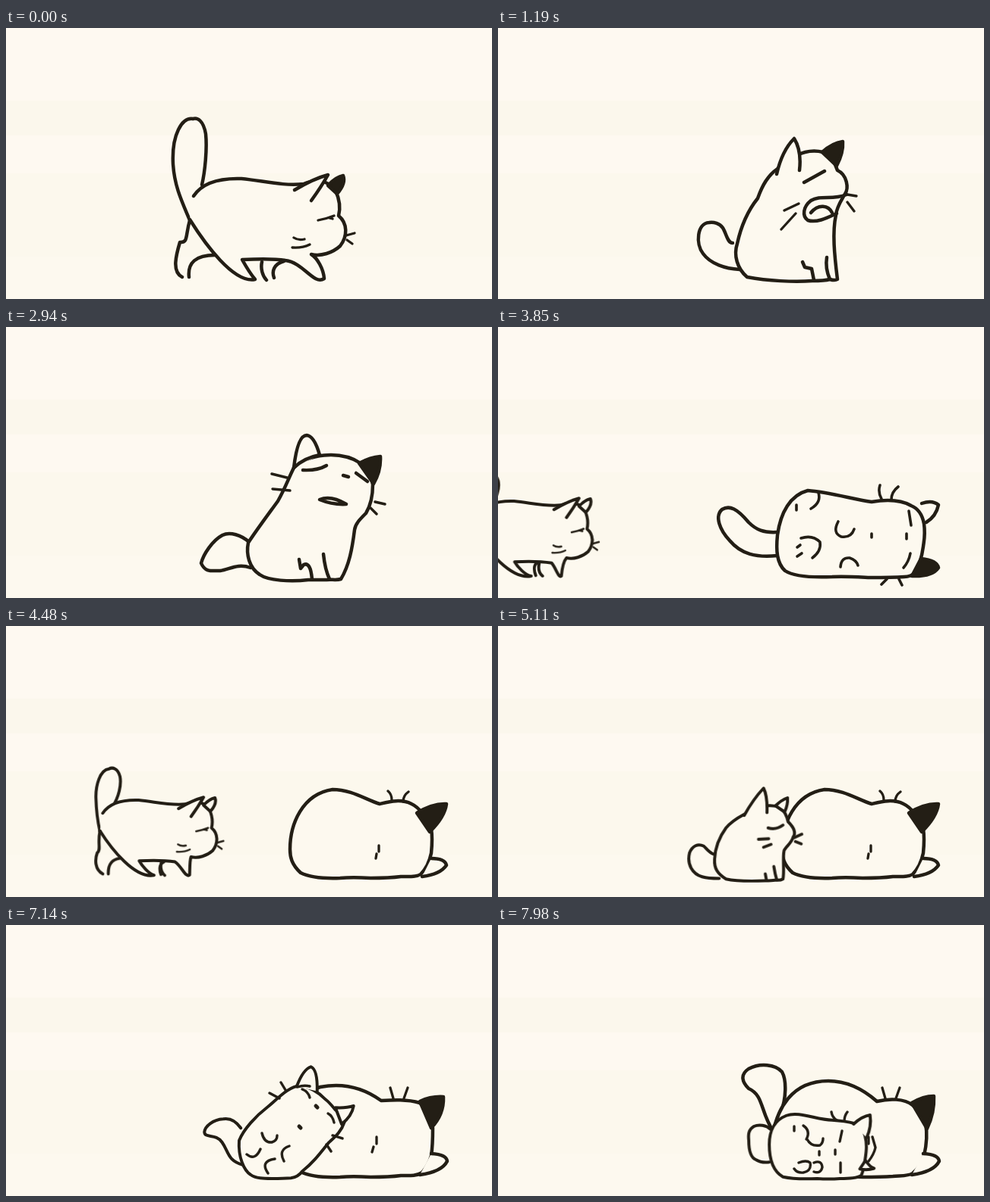
These frames come from a looping animation (640x358 px, 8000 ms). An HTML page without scripts:

```html
<!DOCTYPE html>
<html lang="en">
<head>
<meta charset="utf-8">
<title>Two sleepy cats</title>
<style>
html, body { margin: 0; width: 100%; height: 100%; overflow: hidden; background: #fef9f1; }
svg { display: block; width: 100%; height: 100%; }
.cat { fill: none; stroke: #231e15; stroke-width: 4.5; stroke-linecap: round; stroke-linejoin: round; }
.two { stroke-width: 5.3; }

/* every part holds its own outline for each pose */
.body {
  fill: #fdf9ef;
  --walk: path("M247,222 C258,205 280,198 310,199 C340,202 365,209 392,206 C405,200 425,200 434,215 C440,228 440,240 438,248 C450,258 450,275 440,288 C430,297 415,302 402,299 C410,304 418,318 419,331 C405,340 392,310 368,307 C350,304 330,305 311,306 C316,315 322,325 328,332 C300,338 262,285 242,253");
  --step: path("M247,222 C258,205 280,198 310,199 C340,202 365,209 392,206 C405,200 425,200 434,215 C440,228 440,240 438,248 C450,258 450,275 440,288 C430,297 415,302 402,299 C396,306 394,320 393,331 C388,335 384,318 376,308 C350,304 330,305 311,306 C316,315 330,330 340,331 C305,338 262,285 242,253");
  --sit: path("M307,296 C308,275 316,256 327,241 C336,230 346,224 359,217 C380,202 405,198 423,205 C430,212 434,220 436,230 C446,240 450,250 445,257 C442,268 432,274 429,281 C426,295 430,318 427,331 C422,334 418,333 413,333 C408,334 402,334 396,334 C370,335 345,335 327,331 C312,322 306,312 307,296");
  --yawn: path("M315,285 C320,262 330,240 342,225 C348,208 355,195 368,186 C385,170 405,158 428,164 C437,168 444,178 447,188 C460,194 462,212 457,219 C452,228 446,236 445,247 C440,270 443,300 447,332 C444,334 440,333 437,332 C430,334 420,334 414,334 C390,336 355,334 328,329 C315,318 310,300 315,285");
  --look: path("M319,285 C330,268 345,248 358,230 C368,212 372,200 379,186 C395,168 440,162 467,180 C474,184 480,195 483,208 C483,222 480,236 474,246 C466,254 460,260 459,268 C456,292 452,315 441,333 C435,335 428,333 422,334 C414,334 406,334 398,334 C375,337 345,335 334,327 C320,318 316,300 319,285");
  --tip: path("M336,265 C344,245 365,222 387,205 C405,190 422,170 444,168 C462,172 476,180 487,192 C495,198 500,205 505,211 C512,216 520,222 521,232 C515,250 505,258 493,269 C478,288 465,305 447,319 C442,326 435,330 427,331 C415,332 405,332 393,332 C380,332 365,332 356,325 C345,318 334,295 336,265");
  --belly: path("M368,275 C372,245 385,222 408,216 C435,218 470,228 492,231 C510,228 530,228 544,236 C554,240 559,249 561,260 C563,275 561,282 560,290 C558,305 555,315 549,324 C547,328 540,330 535,330 C520,331 505,331 490,331 C470,330 455,329 440,330 C415,331 390,330 378,322 C367,312 366,295 368,275");
  --curl: path("M374,295 C374,262 390,222 430,216 C455,216 475,230 492,235 C505,232 520,228 534,235 C545,240 555,255 560,268 C562,280 561,290 560,300 C557,315 552,322 546,328 C540,332 530,331 520,331 C505,333 490,333 480,333 C465,332 450,332 440,333 C415,334 400,332 388,326 C376,315 374,305 374,295");
  --flick: path("M374,295 C374,262 390,220 414,214 C445,208 472,216 494,232 C510,231 528,230 545,235 C552,242 558,255 562,268 C562,280 562,291 560,305 C556,318 552,322 548,327 C540,332 530,331 520,331 C505,333 490,333 480,333 C465,332 450,332 440,333 C415,334 400,332 388,326 C376,315 374,305 374,295");
  --end: path("M362,275 C368,245 385,206 435,206 C462,206 482,218 499,233 C515,229 535,229 546,238 C555,245 560,252 563,262 C566,278 564,292 561,305 C557,318 551,324 546,328 C540,332 530,331 520,332 C505,333 490,333 480,333 C465,332 450,332 440,333 C415,334 400,332 388,326 C372,315 362,300 362,275");
  --lie: path("M403,272 C403,245 415,228 433,221 C455,213 485,228 513,229 C530,230 542,232 553,235 C564,240 569,248 571,256 C574,268 574,276 573,285 C572,295 571,302 569,309 C568,318 567,322 564,327 C555,332 540,332 527,332 C515,333 500,333 487,332 C465,333 445,333 427,329 C408,318 403,295 403,272");
}
.tail {
  fill: #fdf9ef;
  --walk: path("M258,207 C262,190 265,160 263,140 C260,122 252,118 246,120 C232,118 218,140 220,180 C222,210 232,230 242,254");
  --sit: path("M307,288 C296,284 292,276 288,273 C278,268 268,272 263,285 C258,305 268,322 285,327 C295,330 305,330 315,330");
  --yawn: path("M309,284 C302,284 301,272 296,264 C292,258 284,256 278,257 C262,258 260,285 270,298 C280,312 300,318 318,319");
  --look: path("M320,284 C310,275 295,270 285,275 C272,282 260,300 257,312 C262,324 270,322 282,322 C295,320 305,312 322,318");
  --tip: path("M339,243 C330,230 320,225 308,227 C290,228 276,240 275,250 C276,262 295,252 306,268 C318,285 315,300 343,308");
  --belly: path("M367,271 C350,272 340,268 330,258 C315,240 305,235 295,241 C285,250 292,268 305,282 C320,300 340,305 368,302");
  --curl: path("M405,280 C402,280 400,282 398,284 C396,286 396,288 396,290 C396,294 398,298 400,300 C402,302 404,302 406,302");
  --end: path("M372,250 C380,228 380,205 374,194 C365,184 345,182 330,190 C318,198 322,208 330,216 C350,225 345,245 362,272");
  --lie: path("M405,245 C398,238 385,236 376,240 C366,246 366,255 367,265 C367,285 372,296 380,299 C388,304 395,304 403,303");
}
.two .tail {
  --up: path("M258,207 C262,190 265,160 263,140 C260,122 252,118 246,120 C232,118 218,140 220,180 C222,210 232,230 242,254");
  --walk: path("M266,212 C280,195 285,175 282,163 C278,150 268,148 262,152 C245,155 240,185 240,200 C240,215 238,230 242,254");
}
.near {
  fill: #fdf9ef;
  --walk: path("M380,214 Q405,199 424,194 Q415,210 402,228");
  --sit: path("M359,219 Q375,190 393,171 Q400,185 399,214");
  --yawn: path("M367,193 Q374,162 390,146 Q400,162 397,188");
  --look: path("M379,186 Q384,143 396,143 Q406,144 413,169");
  --tip: path("M437,170 Q448,140 462,135 Q474,140 473,178");
  --belly: path("M558,233 Q572,228 580,235 Q577,250 564,258");
  --curl: path("M560,307 Q578,307 580,316 Q572,328 548,331");
  --flick: path("M560,302 Q580,303 581,312 Q574,326 545,330");
  --lie: path("M551,236 Q566,222 580,220 Q583,240 574,260");
}
.far {
  fill: #231e15;
  --walk: path("M424,208 Q434,197 444,195 Q448,205 436,219 Z");
  --sit: path("M414,202 Q424,192 435,188 Q436,200 430,213 Z");
  --yawn: path("M427,164 Q440,152 454,150 Q455,165 446,182 Z");
  --look: path("M465,180 Q480,172 493,171 Q494,190 484,207 Z");
  --tip: path("M505,207 Q524,208 537,204 Q534,222 516,236 Z");
  --belly: path("M557,306 Q578,308 580,318 Q572,330 545,329 Z");
  --curl: path("M541,247 Q562,234 580,235 Q578,252 558,272 Z");
  --flick: path("M545,233 Q560,226 576,227 Q577,250 560,268 Z");
  --end: path("M545,235 Q560,226 574,226 Q575,248 565,269 Z");
  --lie: path("M572,300 Q580,312 587,314 Q575,318 562,315 Z");
}
.two .far { fill: #fdf9ef; }
.legs {
  --walk: path("M242,254 C236,275 240,284 229,283 C224,300 218,322 232,329 M241,329 C239,310 250,300 275,300 M337,309 C335,318 338,328 343,333 M366,308 C352,312 350,322 353,330");
  --step: path("M242,254 C238,275 246,288 240,295 C236,305 238,322 252,329 M262,329 C262,315 265,305 278,302 M354,309 C352,318 354,326 360,331 M350,308 C344,312 345,322 348,330");
}

/* drawn on a 70 ms beat */
.one path.part { animation: one 8s steps(4) infinite; }
.two path.part { animation: two 8s steps(4) infinite; }
@keyframes one {
  0%, 5.25%, 6.125% { d: var(--walk); }
  2.625% { d: var(--step, var(--walk)); }
  9.625% { d: var(--sit); }
  14%, 24.5% { d: var(--yawn); }
  29.75%, 37.625% { d: var(--look); }
  42% { d: var(--tip); }
  45.5%, 50.75% { d: var(--belly); }
  56%, 84% { d: var(--curl); }
  88.375%, 90.125% { d: var(--flick, var(--curl)); }
  97.125%, 100% { d: var(--end, var(--flick)); }
}
@keyframes two {
  0%, 44.625%, 51.625% { d: var(--walk); }
  41.125%, 48.125%, 55.125% { d: var(--step, var(--walk)); }
  58.625%, 60.375% { d: var(--up, var(--walk)); }
  63%, 67.375% { d: var(--sit); }
  71.75%, 76.125% { d: var(--yawn); }
  79.625%, 84% { d: var(--look); }
  88.375%, 90.125% { d: var(--tip); }
  94.5%, 100% { d: var(--lie); }
}
.one .move { animation: stroll 8s steps(4) infinite; }
.two .move { animation: enter 8s steps(4) infinite; }
@keyframes stroll {
  0% { transform: translate(0, 0); animation-timing-function: steps(6); }
  5.25%, 6.125% { transform: translate(38px, 0); }
  9.625%, 100% { transform: translate(0, 0); }
}
@keyframes enter {
  0%, 41.125% { transform: translate(-537px, -7px); animation-timing-function: steps(23); }
  61.25% { transform: translate(-14px, -7px); animation-timing-function: steps(2); }
  63%, 100% { transform: translate(0, 0); }
}

/* faces and paws switch hard with the pose */
.pose { opacity: 0; animation: 8s step-end infinite; }
@keyframes walk1 { 0% { opacity: 1; } 7.875%, 100% { opacity: 0; } }
@keyframes sit1 { 0% { opacity: 0; } 7.875% { opacity: 1; } 11.8%, 100% { opacity: 0; } }
@keyframes yawn1 { 0% { opacity: 0; } 11.8% { opacity: 1; } 27.1%, 100% { opacity: 0; } }
@keyframes look1 { 0% { opacity: 0; } 27.1% { opacity: 1; } 39.8%, 100% { opacity: 0; } }
@keyframes tip1 { 0% { opacity: 0; } 39.8% { opacity: 1; } 43.75%, 100% { opacity: 0; } }
@keyframes belly1 { 0% { opacity: 0; } 43.75% { opacity: 1; } 53.375%, 100% { opacity: 0; } }
@keyframes curl1 { 0% { opacity: 0; } 53.375% { opacity: 1; } 86.2%, 100% { opacity: 0; } }
@keyframes nap1 { 0% { opacity: 0; } 86.2%, 100% { opacity: 1; } }
@keyframes walk2 { 0% { opacity: 1; } 61.7%, 100% { opacity: 0; } }
@keyframes sit2 { 0% { opacity: 0; } 61.7% { opacity: 1; } 69.55%, 100% { opacity: 0; } }
@keyframes yawn2 { 0% { opacity: 0; } 69.55% { opacity: 1; } 77.9%, 100% { opacity: 0; } }
@keyframes look2 { 0% { opacity: 0; } 77.9% { opacity: 1; } 86.2%, 100% { opacity: 0; } }
@keyframes tip2 { 0% { opacity: 0; } 86.2% { opacity: 1; } 92.3%, 100% { opacity: 0; } }
@keyframes lie2 { 0% { opacity: 0; } 92.3%, 100% { opacity: 1; } }
</style>
</head>
<body>
<svg viewBox="0 0 640 358">
  <defs>
    <g id="walk" stroke-width="3.3">
      <path d="M411,254 Q422,252 432,248 M426,251 L430,252 M379,277 Q385,281 393,279 M377,290 Q390,291 400,286"/>
      <path d="M448,274 L459,271 M449,280 L456,285"/>
    </g>
    <g id="sit">
      <path d="M401,241 Q415,245 427,236 M384,261 L402,260 M393,275 L406,270 M447,258 L460,252 M449,265 L459,269"/>
      <path d="M398,333 L396,322 M411,309 Q413,322 416,332"/>
    </g>
    <g id="yawn">
      <path d="M403,204 L430,189"/>
      <path d="M459,220 C440,228 425,220 412,228 C402,236 400,248 408,254 C420,258 435,250 446,245 M412,244 C422,232 435,234 440,244"/>
      <path d="M377,241 L396,232 M373,266 L392,245 M460,220 L472,222 M460,230 L469,242" stroke-width="3.3"/>
      <path d="M401,309 L404,316 L413,318 L416,333 M433,303 C431,315 434,325 437,332"/>
    </g>
    <g id="look">
      <path d="M379,186 Q392,173 413,169"/>
      <path d="M391,189 Q410,190 422,183 M444,196 L451,198 M461,193 L476,204"/>
      <path d="M413,228 Q428,222 448,234 Q430,235 413,228 Z"/>
      <path d="M350,194 L370,199 M351,214 L374,216 M486,231 L499,234 M480,239 L488,247" stroke-width="3.4"/>
      <path d="M386,307 L388,319 L392,314 Q401,310 403,333 M418,300 Q420,320 426,333"/>
    </g>
    <g id="tip" transform="translate(-73.3 -114.7) scale(1.3333)" stroke-width="3.4">
      <path d="M384,214 Q392,211 400,213 M390,217 Q398,220 400,228 M424,249 Q430,252 432,261"/>
      <path d="M408,239 L410,241 M386,266 L388,268" stroke-width="5"/>
      <path d="M337,275 Q340,288 350,287 Q357,285 357,278 M317,303 Q328,312 335,296 M373,292 Q358,297 366,312 M354,309 Q334,312 345,328"/>
      <path d="M362,208 L368,218 M347,222 L360,229 M430,278 L443,282 M422,290 L428,299"/>
    </g>
    <g id="belly" stroke-width="3.6">
      <path d="M412,240 Q426,232 422,219 M393,235 V242 M399,279 Q414,274 424,284 Q426,296 414,305 M394,303 L400,299 M394,291 L398,288"/>
      <path d="M448,257 Q440,272 452,277 Q465,279 469,267 M451,317 Q452,304 463,305 Q472,308 474,315 M492,273 V278"/>
      <path d="M541,243 L544,262 M538,273 V280 M543,299 Q541,310 534,318"/>
      <path d="M503,209 Q500,218 505,227 M527,211 Q518,218 518,228 M512,333 L505,340 M528,333 L532,341"/>
    </g>
    <g id="curl" stroke-width="3.3">
      <path d="M503,218 Q508,222 508,230 M530,219 Q523,224 523,232 M491,290 V298 M488,301 L487,307"/>
    </g>
    <g id="nap" stroke-width="3.3">
      <path d="M506,215 L510,229 M529,215 L524,229 M488,280 V289 M484,293 L482,300"/>
    </g>
    <g id="lie" transform="translate(-73.3 -114.7) scale(1.3333)" stroke-width="3.4">
      <path d="M402,265 Q412,272 406,283 M390,266 V272 M407,283 Q412,293 424,291 Q428,288 428,282"/>
      <path d="M423,299 V304 M444,297 V303 M453,272 L450,286 M451,314 V327"/>
      <path d="M390,322 Q394,328 402,327 Q413,325 411,314 Q406,310 396,314 M416,314 Q426,310 427,320 Q425,329 416,326"/>
      <path d="M439,247 Q440,254 446,258 M460,247 Q456,252 456,259 M493,280 L497,294 Q495,303 488,312"/>
    </g>
  </defs>

  <rect width="640" height="358" fill="#fef9f1"/>
  <rect y="96" width="640" height="46" fill="#fbf7ec"/>
  <rect y="192" width="640" height="110" fill="#fcf8ed"/>
  <rect y="302" width="640" height="56" fill="#fdf9ef"/>

  <g class="cat one">
    <g class="move">
      <path class="part tail"/>
      <path class="part body"/>
      <path class="part far"/>
      <path class="part near"/>
      <g class="pose" style="animation-name:walk1"><use href="#walk"/><path class="part legs"/></g>
      <use class="pose" style="animation-name:sit1" href="#sit"/>
      <use class="pose" style="animation-name:yawn1" href="#yawn"/>
      <use class="pose" style="animation-name:look1" href="#look"/>
      <use class="pose" style="animation-name:tip1" href="#tip"/>
      <use class="pose" style="animation-name:belly1" href="#belly"/>
      <use class="pose" style="animation-name:curl1" href="#curl"/>
      <use class="pose" style="animation-name:nap1" href="#nap"/>
    </g>
  </g>

  <g class="cat two" transform="translate(55 86) scale(.75)">
    <g class="move">
      <path class="part tail"/>
      <path class="part body"/>
      <path class="part far"/>
      <path class="part near"/>
      <g class="pose" style="animation-name:walk2"><use href="#walk"/><path class="part legs"/></g>
      <use class="pose" style="animation-name:sit2" href="#sit"/>
      <use class="pose" style="animation-name:yawn2" href="#yawn"/>
      <use class="pose" style="animation-name:look2" href="#look"/>
      <use class="pose" style="animation-name:tip2" href="#tip"/>
      <use class="pose" style="animation-name:lie2" href="#lie"/>
    </g>
  </g>
</svg>
</body>
</html>
```
